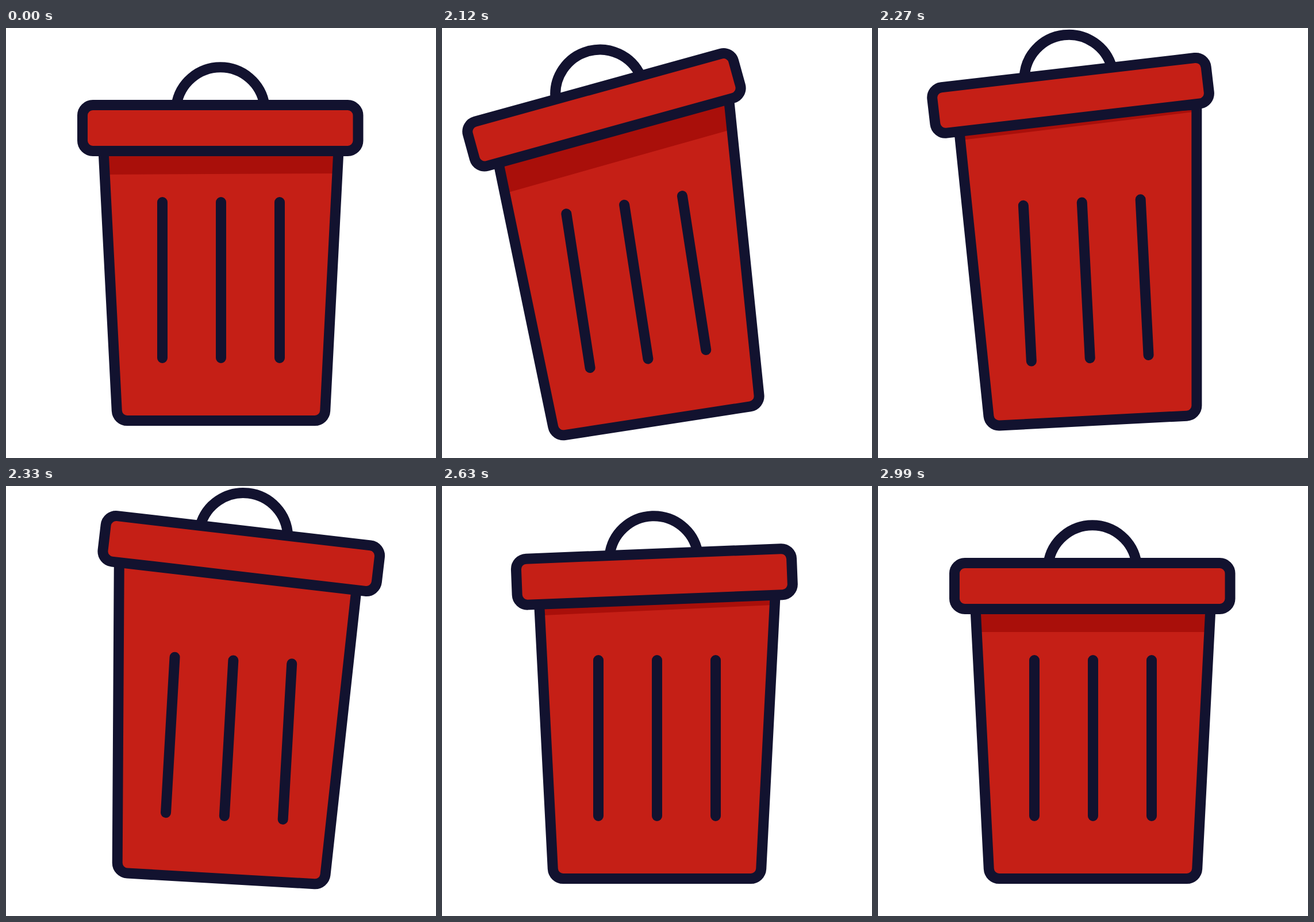
An HTML page for the animation above (3.08 s loop, 748x748 px).

```html
<!DOCTYPE html>
<html lang="en">
<head>
<meta charset="utf-8">
<title>Bin</title>
<style>
  html, body { margin: 0; width: 100%; height: 100%; overflow: hidden; background: #fff; }
  svg { display: block; width: 100%; height: 100%; }
  .line { fill: none; stroke: #12122f; stroke-width: 18; stroke-linejoin: round; }
  .red { fill: #c51f16; }
  .shade { fill: #a90f0a; }
  .ribs { stroke-linecap: round; }
</style>
</head>
<body>
<svg viewBox="0 0 748 748">
  <defs>
    <path id="can" d="M166.2 148 L192.8 666 A18 18 0 0 0 210.8 683 H537.2 A18 18 0 0 0 555.2 666 L581.8 148 Q582 143.5 577 143.5 H171 Q166 143.5 166.2 148 Z"/>
    <clipPath id="inside"><use href="#can"/></clipPath>
  </defs>
  <g id="bin">
    <use href="#can" class="red"/>
    <g clip-path="url(#inside)">
      <rect id="shade" class="shade" x="60" y="100" width="630" height="154"/>
    </g>
    <use href="#can" class="line"/>
    <path class="line ribs" d="M272 303 V574 M374 303 V574 M476 303 V574"/>
    <g id="lid">
      <path class="line" d="M296.4 134 A77.5 77.5 0 0 1 449.6 134"/>
      <g class="red"><rect x="133" y="134" width="479.5" height="80" rx="18"/></g>
      <rect class="line" x="133" y="134" width="479.5" height="80" rx="18"/>
    </g>
  </g>
</svg>
<script>
  const LOOP = 3080, START = 2030, STEP = 30, LAST = 32;
  const [bin, lid, shade] = ['bin', 'lid', 'shade'].map(id => document.getElementById(id));

  // Progress from step a to step b, held at 0 before and 1 after.
  const span = (k, a, b) => Math.min(1, Math.max(0, (k - a) / (b - a)));
  const kick = (k, a, b) => Math.sin(span(k, a, b) * Math.PI / 2);
  const swing = (k, a, b) => (1 - Math.cos(span(k, a, b) * Math.PI)) / 2;

  const binTurn = k =>
    -10 * kick(k, -1.45, 5.1) + 14.1 * swing(k, 5.1, 10.9) - 4.1 * swing(k, 10.9, 17.3);

  const lidTurn = k =>
    -8.9 * swing(k, -1, 5) + 20.9 * swing(k, 5, 14) - 15 * swing(k, 14, 21) + 3 * swing(k, 21, LAST);

  const lidY = k => -58 * kick(k, -0.7, 7) * (1 - swing(k, 9, 26));

  // The lid drifts left as it rises and jolts right when the bin swings back.
  const lidX = k => 0.21 * lidY(k) + 17 * Math.exp(-(((k - 10.3) / 1.8) ** 2));

  const shadeY = k => -91 * swing(k, -1, 10) * (1 - span(k, 10, LAST) ** 0.68);
  const shadeTilt = k => 0.3 * (swing(k, 20, LAST) - 1);

  function draw(time) {
    const t = time % LOOP - START;
    const k = t < 0 ? -2 : Math.min(LAST, Math.floor(t / STEP));
    const x = lidX(k), turn = lidTurn(k);
    const pose = (y, angle) => `translate(${x} ${y}) rotate(${angle} 372.5 174)`;

    bin.setAttribute('transform', `rotate(${binTurn(k)} 376 676.5)`);
    lid.setAttribute('transform', pose(lidY(k), turn));
    shade.setAttribute('transform', pose(shadeY(k), turn + shadeTilt(k)));
  }

  const begin = performance.now();
  function tick() {
    draw(performance.now() - begin);
    requestAnimationFrame(tick);
  }
  tick();
</script>
</body>
</html>
```
